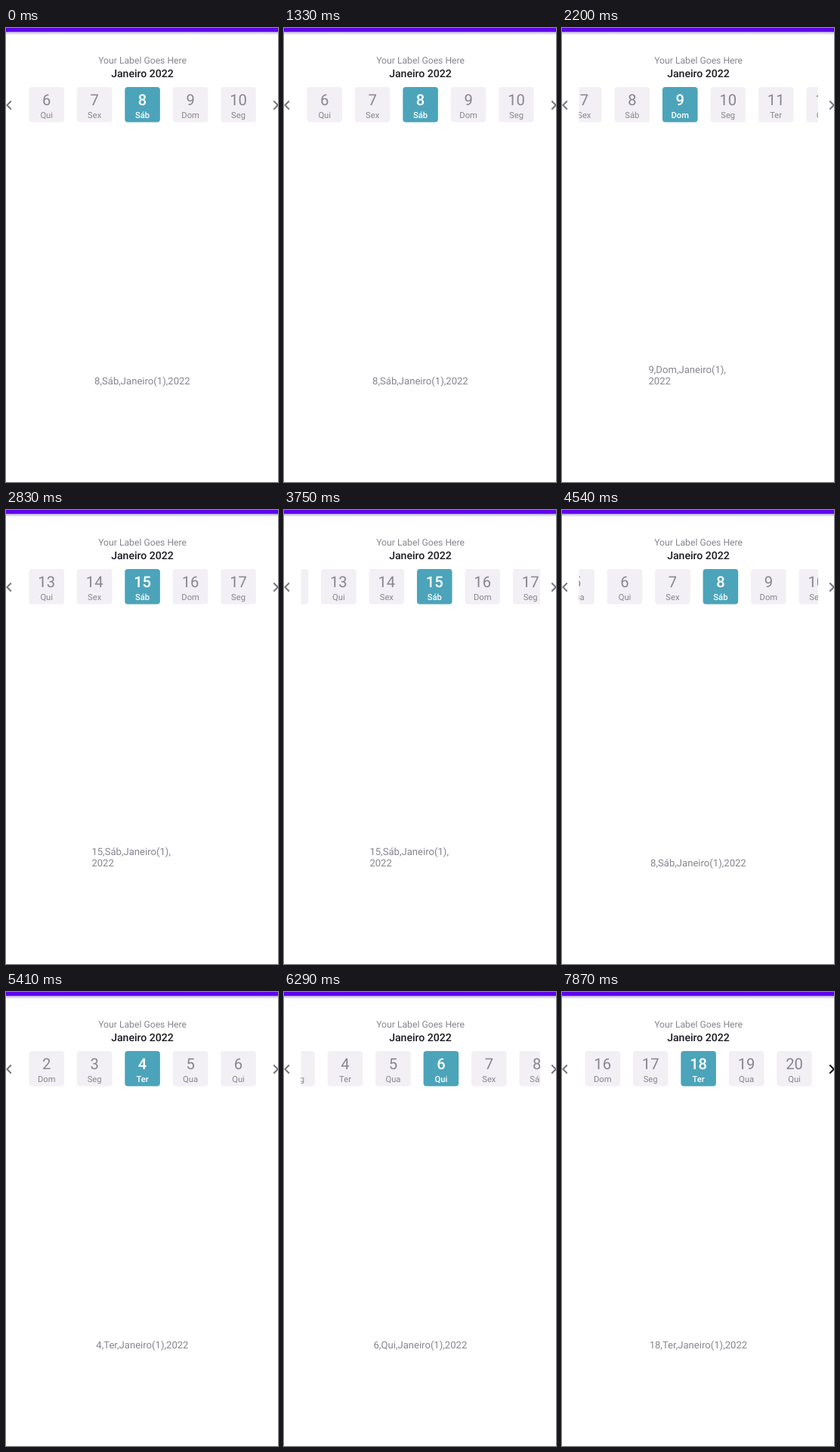
These frames come from a looping animation (360 by 600 pixels, 8000 ms). An HTML page:

```html
<!DOCTYPE html>
<html lang="pt">
<head>
<meta charset="utf-8">
<title>Date picker</title>
<style>
  html, body { margin: 0; width: 100%; height: 100%; overflow: hidden; background: #fff; }
  svg { display: block; width: 360px; height: 600px; }
  text { font-family: Roboto, "Open Sans", sans-serif; fill: #87858e; text-rendering: geometricPrecision; }
  .mid { text-anchor: middle; }
  .label { font-size: 12.2px; }
  .month { font-size: 14.1px; font-weight: 500; fill: #1c1c22; }
  .num { font-size: 20.2px; }
  .name { font-size: 11.2px; }
  .date { font-size: 13.1px; }
  .card rect { fill: #f2f0f5; }
  .on rect { fill: #4ca4ba; }
  .on text { fill: #fff; font-weight: 500; }
  .arrow { fill: none; stroke: #77757b; stroke-width: 2; }
  #next { animation: press 8s step-end infinite; }
  @keyframes press { 98.37% { stroke: #111; } }
</style>
</head>
<body>
<svg viewBox="0 0 360 600">
  <defs>
    <linearGradient id="shade" x2="0" y2="1">
      <stop stop-color="#b3a6dc"/>
      <stop offset="1" stop-color="#fff"/>
    </linearGradient>
    <clipPath id="view"><rect x="22.5" y="70" width="316.5" height="60"/></clipPath>
  </defs>
  <rect y="5" width="360" height="4" fill="url(#shade)"/>
  <rect width="360" height="5" fill="#6002ee"/>
  <text class="mid label" x="180.6" y="46.5">Your Label Goes Here</text>
  <text class="mid month" x="180.5" y="64.5">Janeiro 2022</text>
  <path class="arrow" d="M6.8 96.5 1.300 102l5.500 5.500"/>
  <path class="arrow" id="next" d="M354.300 96.500 359.800 102l-5.500 5.500"/>
  <g clip-path="url(#view)"><g id="strip"></g></g>
  <text class="date" id="line1"></text>
  <text class="date" id="line2" y="471"></text>
</svg>
<script>
const LOOP = 8000, PITCH = 63.45, CENTER = 180.6, MAX_LINE = 130.7;
const NAMES = ['Sex', 'Sáb', 'Dom', 'Seg', 'Ter', 'Qua', 'Qui'];

const easeOut = u => 1 - (1 - u) ** 2;
const easeBoth = u => u * u * (3 - 2 * u);
const jump = () => 1;
// The swipes: when they run and which day they bring to the centre
const SWIPES = [
  { start: 1950, end: 2830, to: 15, ease: easeBoth },
  { start: 3740, end: 4200, to: 8.78, ease: easeOut },
  { start: 4400, end: 5410, to: 4, ease: easeOut },
  { start: 6290, end: 6300, to: 5.57, ease: jump },
  { start: 6400, end: 6700, to: 18, ease: easeOut }
];

const byId = id => document.getElementById(id);
const strip = byId('strip'), line1 = byId('line1'), line2 = byId('line2');
const nameOf = day => NAMES[day % 7];

strip.innerHTML = Array.from({ length: 22 }, (_, i) => {
  const day = i + 1;
  return `<g class="card" transform="translate(${day * PITCH})">
    <rect x="-23.3" y="78" width="46.6" height="46.600" rx="4"/>
    <text class="mid num" y="102">${day}</text>
    <text class="mid name" y="119">${nameOf(day)}</text></g>`;
}).join('');
const cards = [...strip.children];

let shown = 0;
function select(day) {
  if (day === shown) return;
  shown = day;
  cards.forEach((card, i) => card.classList.toggle('on', i + 1 === day));
  const head = `${day},${nameOf(day)},Janeiro(1),`;
  line1.textContent = head + '2022';
  const width = line1.getComputedTextLength();
  const wrap = width > MAX_LINE;
  for (const line of [line1, line2]) line.setAttribute('x', 180.4 - width / 2);
  line1.setAttribute('y', wrap ? 455.5 : 471);
  if (wrap) line1.textContent = head;
  line2.textContent = wrap ? '2022' : '';
}

function centreDay(t) {
  let day = 8;
  for (const { start, end, to, ease } of SWIPES) {
    if (t < start) break;
    day += (to - day) * ease(Math.min(1, (t - start) / (end - start)));
  }
  return day;
}

function draw(t) {
  const day = centreDay(t);
  strip.setAttribute('transform', `translate(${CENTER - day * PITCH})`);
  select(Math.round(day));
}

const begin = performance.now();
function tick() {
  draw((performance.now() - begin) % LOOP);
  requestAnimationFrame(tick);
}
tick();
</script>
</body>
</html>
```
